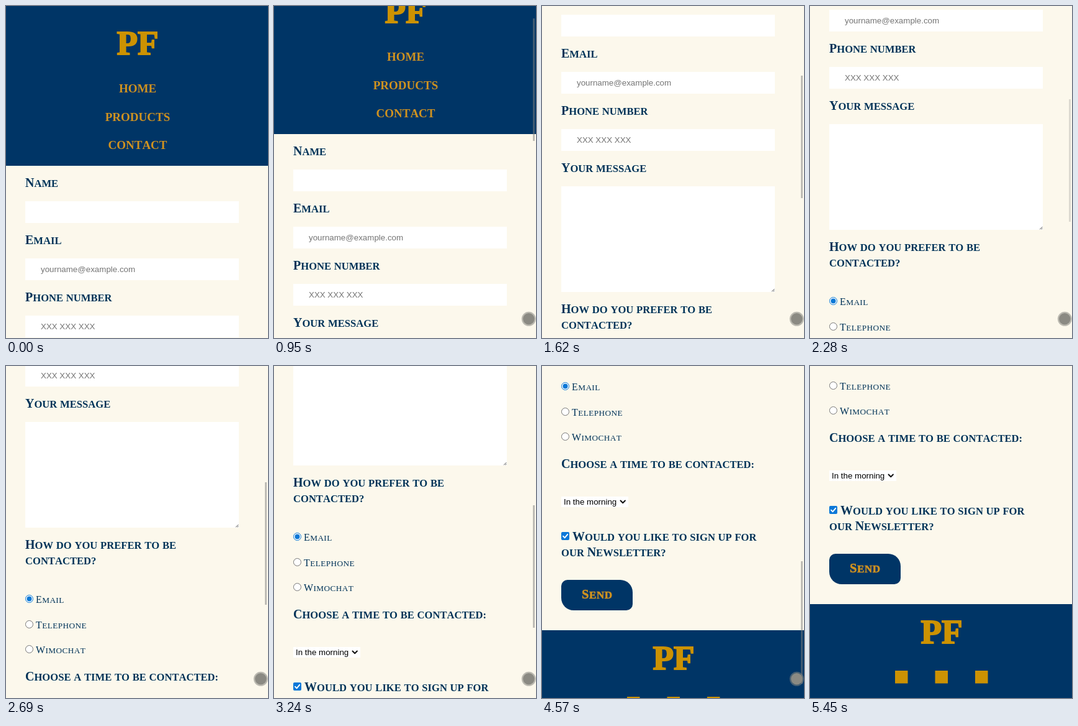
Write an HTML page that moves like this. It is 422 by 534 pixels and loops after 5840 ms.

```html
<!DOCTYPE html>
<html lang="en">
<head>
<meta charset="utf-8">
<title>Contact form</title>
<style>
  html, body { margin: 0; width: 100%; height: 100%; overflow: hidden; background: #fcf8ec; }
  svg { display: block; width: 100%; height: 100%; }
  text { white-space: pre; }
  .serif { font-family: "Liberation Serif", "Times New Roman", serif; font-kerning: none; fill: #003358; }
  .bold { font-weight: 700; }
  .sans { font: 13.333px "Liberation Sans", Arial, sans-serif; fill: #757575; }
  .choice { fill: #000; }
  .gold { fill: #cf9220; }
  .logo { font-size: 55px; fill: #cc9202; stroke: #cc9202; stroke-width: 2; }
  .mid { text-anchor: middle; }
  .label { word-spacing: .6px; }
  .light { letter-spacing: .4px; }
  .send { stroke: #cf9220; stroke-width: .6; letter-spacing: .6px; }
  .navy { fill: #003566; }
  .field { fill: #fff; }
  .line { fill: none; stroke-linecap: round; stroke-linejoin: round; }
</style>
</head>
<body>
<svg viewBox="0 0 422 534">
  <rect width="422" height="534" fill="#fcf8ec"/>
  <g id="page"></g>
  <rect id="thumb" x="417" width="3" height="197" fill="#808080" fill-opacity=".5"/>
  <g id="touch">
    <circle cx="410.3" cy="503.3" r="11.5" fill="#85857f" fill-opacity=".55"/>
    <circle cx="410.3" cy="503.3" r="9.2" fill="#8b8a83"/>
  </g>
</svg>
<script>
const LOOP = 5840;
const SMALL_CAP = 0.83;
const page = document.getElementById('page');
const thumb = document.getElementById('thumb');
const touch = document.getElementById('touch');

const rect = (cls, x, y, w, h) =>
  `<rect class="${cls}" x="${x}" y="${y}" width="${w}" height="${h}"/>`;
const text = (cls, x, y, content, size = '') =>
  `<text class="${cls}" x="${x}" y="${y}"${size && ` font-size="${size}"`}>${content}</text>`;

// Capitals at full size, everything else as reduced capitals.
function smallCaps(cls, x, y, words, size) {
  const spans = words.split(/([A-Z])/).filter(Boolean).map(part => {
    const scale = /^[A-Z]$/.test(part) ? 1 : SMALL_CAP;
    return `<tspan font-size="${size * scale}">${part.toUpperCase()}</tspan>`;
  });
  return text('serif ' + cls, x, y, spans.join(''));
}
const label = (words, y, x = 31) => smallCaps('bold label', x, y, words, 20);
const navLink = (words, y) => text('serif bold gold mid', 212, y, words, 19);
const logo = y => text('serif bold logo mid', 212, y, 'PF');

function radio(words, y, checked) {
  const ring = checked ? '#0a78d6' : '#767676';
  const dot = checked ? `<circle cx="37.5" cy="${y}" r="4" fill="${ring}"/>` : '';
  return `<circle cx="37.5" cy="${y}" r="6" fill="#fff" stroke="${ring}"/>` + dot +
    smallCaps('light', 48, y + 6.2, words, 16);
}

page.innerHTML = [
  rect('navy', 0, 0, 422, 257),
  logo(78),
  navLink('HOME', 139),
  navLink('PRODUCTS', 185),
  navLink('CONTACT', 230),

  label('Name', 291),
  rect('field', 31, 314, 344, 35),
  label('Email', 383),
  rect('field', 31, 406, 344, 35),
  text('sans', 56, 428, 'yourname@example.com'),
  label('Phone number', 475),
  rect('field', 31, 498, 344, 35),
  text('sans', 56, 519.5, 'XXX XXX XXX'),
  label('Your message', 567),
  rect('field', 31, 590, 344, 170),
  '<path class="line" d="M370.5 759l3.5-3.5M373 759l1-1" stroke="#444"/>',

  label('How do you prefer to be', 794),
  label('contacted?', 819),
  radio('Email', 874.5, true),
  radio('Telephone', 915.5),
  radio('Wimochat', 955.5),

  label('Choose a time to be contacted:', 1005.5),
  rect('field', 31, 1052, 108, 17),
  text('sans choice', 35, 1065, 'In the morning'),
  '<path class="line" d="M126.5 1058.5l3.7 3.7 3.7-3.7" stroke="#111" stroke-width="2"/>',

  '<rect x="31" y="1109" width="13" height="13" rx="2" fill="#0b78d8"/>',
  '<path class="line" d="M34 1115.7l2.6 2.7 4.6-5.6" stroke="#fff" stroke-width="1.9"/>',
  label('Would you like to sign up for', 1122.5, 49),
  label('our Newsletter?', 1147.8),

  '<path class="navy" d="M41 1186H126a20 20 0 0 1 20 20v19a10 10 0 0 1-10 10H51a20 20 0 0 1-20-20v-19a10 10 0 0 1 10-10z"/>',
  smallCaps('bold gold send', 64, 1216, 'Send', 20.5),

  rect('navy', 0, 1267, 422, 151),
  logo(1330),
  ...[137, 201.5, 266].map(x => `<rect x="${x}" y="1374" width="20.5" height="20.5" fill="#cc9202"/>`)
].join('');

// Wheel notches: start, end, number of visible steps, resting offset.
const notches = [
  [880, 1080, 4, 101], [1150, 1350, 4, 200], [1490, 1620, 3, 300],
  [1820, 1950, 3, 400], [2550, 2690, 3, 500], [3100, 3240, 3, 600],
  [3500, 3700, 4, 700], [4040, 4240, 4, 800], [4500, 4710, 4, 884]
];

function ease(p) {
  const a = p ** 1.73, b = (1 - p) ** 1.73;
  return a / (a + b);
}

function scrollAt(t) {
  let offset = 0, idle = Infinity;
  for (const [start, end, steps, rest] of notches) {
    if (t < start) break;
    const gap = (end - start) / (steps - 1);
    const step = Math.min(steps, Math.floor((t - start + 7) / gap) + 1);
    offset += (rest - offset) * ease(step / steps);
    idle = t - end;
  }
  return { offset: Math.round(offset), idle };
}

function touchOpacity(t) {
  if (t < 350) return 0;
  if (t < 420) return 0.5;
  if (t < 5180) return 1;
  return Math.max(0, 0.8 - 0.2 * Math.floor((t - 5180) / 67.5));
}

function draw(t) {
  const { offset, idle } = scrollAt(t);
  page.setAttribute('transform', `translate(0 ${-offset})`);
  thumb.setAttribute('y', Math.round(0.372 * offset + 0.8));
  thumb.setAttribute('opacity', idle < 330 ? 1 : idle < 460 ? 0.5 : 0);
  touch.setAttribute('opacity', touchOpacity(t));
}

const began = performance.now();
function tick() {
  draw((performance.now() - began) % LOOP);
  requestAnimationFrame(tick);
}
tick();
</script>
</body>
</html>
```
